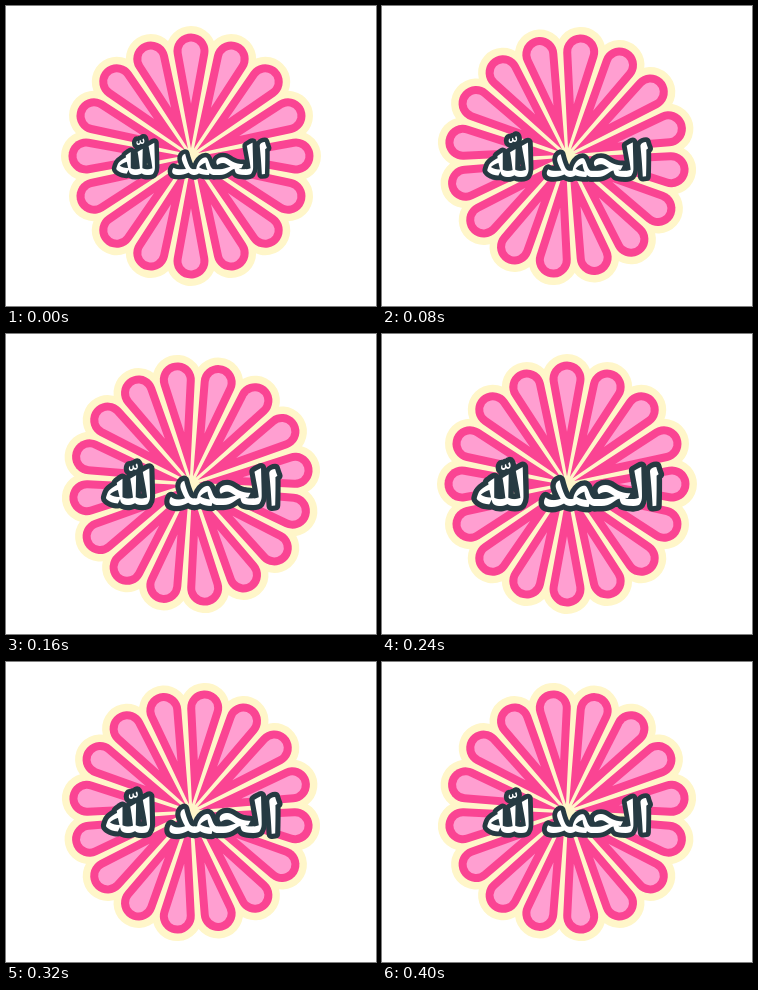
Write an HTML page with a canvas that moves like this. It is 370x300 px and loops after 480 ms.

```html
<!DOCTYPE html>
<html lang="ar">
<head>
<meta charset="utf-8">
<style>
html, body { margin: 0; height: 100%; overflow: hidden; background: #fff; }
canvas { display: block; }
</style>
</head>
<body>
<canvas id="stage" width="370" height="300"></canvas>
<script>
const ctx = document.getElementById('stage').getContext('2d');
const PETALS = 16, STEP = 80, STEPS = 6;
const REACH = 105, TAPER = Math.asin(0.18);
const LAYERS = [[25, '#fff6c9'], [17.5, '#fa4493'], [9.5, '#ff9fd1']];
const PHRASE = 'الحمد للّه', TEXT_WIDTH = 151;
const face = size => `bold ${size}px "Noto Naskh Arabic", "DejaVu Sans", sans-serif`;

// Teardrop along +x: round cap with two tangents meeting in a point
function drop(r) {
  const a = Math.PI / 2 + TAPER;
  ctx.beginPath();
  ctx.arc(REACH, 0, r, -a, a);
  ctx.lineTo(REACH - r / Math.sin(TAPER), 0);
  ctx.fill();
}

function flower(turn) {
  ctx.save();
  ctx.translate(185, 150);
  ctx.rotate(turn);
  for (const [r, color] of LAYERS) {
    ctx.fillStyle = color;
    for (let i = 0; i < PETALS; i++) {
      drop(r);
      ctx.rotate(2 * Math.PI / PETALS);
    }
  }
  ctx.restore();
}

function phrase(scale) {
  ctx.save();
  ctx.translate(185.5, 150.5);
  ctx.scale(scale, scale);
  ctx.direction = 'rtl';
  ctx.textAlign = 'center';
  ctx.font = face(100);
  let m = ctx.measureText(PHRASE);
  ctx.font = face(100 * TEXT_WIDTH / (m.actualBoundingBoxLeft + m.actualBoundingBoxRight));
  m = ctx.measureText(PHRASE);
  const x = (m.actualBoundingBoxLeft - m.actualBoundingBoxRight) / 2;
  const y = (m.actualBoundingBoxAscent - m.actualBoundingBoxDescent) / 2;
  ctx.lineJoin = 'round';
  ctx.lineWidth = 9;
  ctx.strokeStyle = '#263a42';
  ctx.strokeText(PHRASE, x, y);
  ctx.fillStyle = '#fff';
  ctx.fillText(PHRASE, x, y);
  ctx.restore();
}

function draw() {
  const step = Math.floor(performance.now() / STEP) % STEPS;
  ctx.clearRect(0, 0, 370, 300);
  flower(step * 2 * Math.PI / PETALS / 3);
  phrase(1 + 0.07 * (3 - Math.abs(3 - step)));
  requestAnimationFrame(draw);
}
draw();
</script>
</body>
</html>
```
